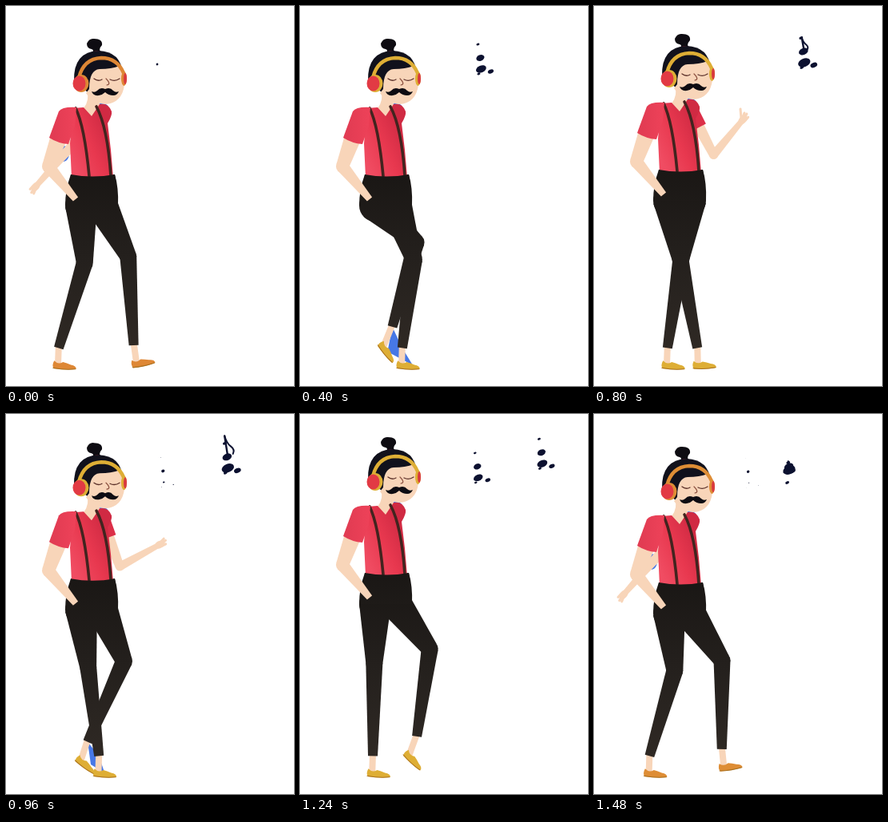
Animation, 360 px wide and 476 px high, one loop 1520 ms. Source, as an HTML page with a canvas:

```html
<!DOCTYPE html>
<html lang="en">
<head>
<meta charset="utf-8">
<title>Walking to music</title>
<style>
html, body { margin: 0; height: 100%; overflow: hidden; background: #fff; }
canvas { display: block; width: 360px; height: 476px; }
</style>
</head>
<body>
<canvas id="stage"></canvas>
<script>
const LOOP = 1520, STEP = 40, STANCE = 850;
const SKIN = '#f8d5b9', INK = '#0e0c12', NAVY = '#0c1130', BLUE = '#4778e6';
const canvas = document.getElementById('stage');
const dpr = window.devicePixelRatio || 1;
canvas.width = 360 * dpr;
canvas.height = 476 * dpr;
const ctx = canvas.getContext('2d');

// Key poses: time, then values
const bob = [[0, 0], [400, 0], [600, -12.5], [800, -6], [1080, -4], [1240, -12], [1480, 0]];
const reach = [[0, 39, 224], [400, 127, 238], [600, 203, 158], [800, 184, 145],
  [1080, 193, 178], [1240, 112, 236], [1480, 39, 224]];

const clamp = (v, lo = 0, hi = 1) => Math.min(hi, Math.max(lo, v));
const smooth = u => u * u * (3 - 2 * u);

function pose(keys, t) {
  const i = keys.findLastIndex(k => k[0] <= t), a = keys[i], b = keys[i + 1] || a;
  const u = smooth(clamp((t - a[0]) / (b[0] - a[0] || 1)));
  return a.slice(1).map((v, n) => v + (b[n + 1] - v) * u);
}

// Middle joint of a two-bone limb; side tells which way it folds
function bend(x0, y0, x1, y1, upper, lower, side) {
  const dx = x1 - x0, dy = y1 - y0, d = Math.hypot(dx, dy);
  const along = d < upper + lower
    ? (upper * upper - lower * lower + d * d) / (2 * d)
    : d * upper / (upper + lower);
  const out = side * Math.sqrt(Math.max(0, upper * upper - along * along)) * (d < upper + lower);
  return [x0 + (dx * along - dy * out) / d, y0 + (dy * along + dx * out) / d];
}

// One stride: the foot slides back on the ground, then swings forward
function stride(p, shift) {
  const u = clamp((p - STANCE) / (LOOP - STANCE));
  const x = shift + (p < STANCE ? 171 - 0.09 * p : 94.5 + 76.5 * smooth(u));
  const lift = 17 * Math.pow(Math.sin(Math.PI * u), 0.6);
  const deg = p < STANCE
    ? 3 - 15 * clamp(1 - p / 120)
    : 3 + 55 * Math.sin(Math.PI * Math.min(1, u * 1.25)) - 15 * u ** 4;
  const y = 450 - (lift || 0) + Math.min(0, deg) / 3;
  return { x, y, deg, ankleX: x - 8 + 0.28 * deg, ankleY: y - 21 - 0.2 * Math.max(0, deg) };
}

function fill(d, color) {
  ctx.fillStyle = color;
  ctx.fill(new Path2D(d));
}

function line(d, color, width) {
  ctx.strokeStyle = color;
  ctx.lineWidth = width;
  ctx.stroke(new Path2D(d));
}

function oval(x, y, rx, ry, color, turn = 0) {
  ctx.fillStyle = color;
  ctx.beginPath();
  ctx.ellipse(x, y, Math.max(0, rx), Math.max(0, ry), turn, 0, 7);
  ctx.fill();
}

function blend(x0, y0, x1, y1, ...colors) {
  const g = ctx.createLinearGradient(x0, y0, x1, y1);
  colors.forEach((c, i) => g.addColorStop(i / (colors.length - 1), c));
  return g;
}

const cloth = blend(0, 200, 0, 430, '#191614', '#24201d', '#2f2924');
const shirt = blend(80, 190, 134, 165, '#f04c62', '#e8384f', '#d02a43');

// Tapered limb through [x, y, radius] joints; the end is cut square
function limb(joints, color) {
  for (let i = 0; i < joints.length - 1; i++) {
    const [x, y, r] = joints[i], [x2, y2, r2] = joints[i + 1];
    const len = Math.hypot(x2 - x, y2 - y) || 1;
    const nx = (y - y2) / len, ny = (x2 - x) / len;
    fill(`M${x + nx * r} ${y + ny * r}L${x2 + nx * r2} ${y2 + ny * r2}` +
      `L${x2 - nx * r2} ${y2 - ny * r2}L${x - nx * r} ${y - ny * r}Z`, color);
    oval(x, y, r, r, color);
  }
}

function drawLeg(foot, hipX, hipY, gold) {
  const { x, y, deg, ankleX, ankleY } = foot, a = deg * Math.PI / 180;
  const [kneeX, kneeY] = bend(hipX, hipY, ankleX, ankleY, 72, 112, -0.9);
  line(`M${ankleX} ${ankleY - 3}L${x - 8 * Math.cos(a)} ${y - 8 * Math.sin(a)}`, SKIN, 8);
  ctx.save();
  ctx.translate(x, y);
  ctx.rotate(a);
  fill('M-13 -5Q-8 0 -2 -4Q3 -3 8 -1Q15 0 15 4Q8 6 -13 5Q-16 1 -13 -5Z', gold);
  line('M-14 4Q0 6 14 4', '#a8701f', 1);
  ctx.restore();
  limb([[hipX, hipY, 20], [kneeX, kneeY, 10.5], [ankleX, ankleY, 6]], cloth);
}

function drawFarArm(t, dy) {
  const x = 119, y = 134 + dy, [hx, hy] = pose(reach, t);
  const [ex, ey] = bend(x, y, hx, hy, 66, 54, 1);
  oval(119, 125 + dy, 8, 3, BLUE);
  if (Math.abs(hx - x) > 77) oval(72, 185 + dy * 0.4, 7, 10, BLUE);
  limb([[x, y, 8], [ex, ey, 5.5], [hx, hy, 3.5]], SKIN);
  ctx.save();
  ctx.translate(hx, hy);
  ctx.rotate(Math.atan2(hy - ey, hx - ex));
  oval(3, 0, 7, 4.5, SKIN);
  line('M5 -2L11 -4M6 0L12 -1M5 3L10 3', SKIN, 3);
  ctx.restore();
  if (t >= 720 && t < 920) line(`M${hx} ${hy - 5}L${hx - 1} ${hy - 16}`, SKIN, 3);
  const k = 27 / Math.hypot(ex - x, ey - y);
  limb([[x, y, 10], [x + (ex - x) * k, y + (ey - y) * k, 9.5]], '#dc2f48');
}

function drawBody() {
  fill('M81 211Q108 216 136 211Q141 228 140 250L74 250Q74 230 81 211Z', cloth);
  fill('M101 104Q105 118 97 128L107 139L118 124Q115 121 116 114Z', SKIN);
  fill('M84 128L97 127L107 138L117 123Q128 121 132 132Q133 137 127 147L131 180L134 215' +
    'L82 215L80 172Z', shirt);
  line('M87 128Q98 150 104 213M113 126Q127 152 131 213', '#42241f', 3.6);
  limb([[66, 165, 10.5], [53, 201, 8], [87, 242, 4]], SKIN);
  fill('M88 127Q70 126 66 132L54 165Q65 172 78 173L86 150Z',
    blend(60, 150, 88, 150, '#e23c53', '#ee4259'));
  fill('M81 211Q108 216 136 211L138 222L80 222Z', cloth);
}

function drawHead(gold) {
  fill('M101 47Q104 40 110 41Q121 41 120 49Q117 52 117 55Q119 59 122 61L107 61' +
    'Q111 55 107 54Q101 53 101 47Z', INK);
  oval(114, 58, 5, 1.8, '#b3283a');
  fill('M85 94Q84 57 116 56Q143 57 146 84L142 96L102 108Z', '#11111c');
  fill('M104 104Q104 80 117 79Q132 79 142 75Q149 86 148 99Q145 121 125 123' +
    'Q108 122 100 109Z', SKIN);
  line('M91 90Q97 66 119 65Q139 65 147 84', gold, 4.5);
  oval(147.5, 91, 3.5, 9, gold);
  oval(149, 91, 2, 7, '#d93a3f');
  oval(94, 97, 9.5, 11, gold);
  oval(91.5, 97, 8, 9.5, '#e23a44');
  line('M110 91Q115 95 120 92M130 92Q136 95 142 91', '#5b3029', 1.3);
  line('M125 91Q132 98 126 99', '#8c5140', 1.2);
  fill('M124 104Q118 101 114 106Q111 109 107 107Q109 113 116 112Q121 111 124 108' +
    'Q128 112 134 112Q139 112 141 107Q137 109 134 106Q130 101 124 104Z', INK);
}

// A note drifts up to the right; its drops gather, form a stem and scatter again
function drawNote(age, lit) {
  const x = 189 + 0.091 * age, y = 73 - 0.02 * age + 5 * clamp(1 - Math.abs(age - 600) / 150);
  const size = clamp(age / 480), spread = clamp(Math.abs(age - 600) / 200, 0.3);
  const fade = 1 - clamp((age - 1220) / 120);
  const drop = (dx, dy, r) =>
    oval(x + dx, y + dy, r * size * fade, r * 0.65 * size * fade, lit ? '#2c57b8' : NAVY, -0.4);
  drop(1 * spread, 14 * spread, 8);
  drop(-3 * spread, -17 * spread, 2.5);
  drop(13 * spread, 17 * spread, 4.5);
  drop(-2, 20, 2.5);
  oval(x, y, 1.4 + 4.6 * size * fade, 1.4 + 2.8 * size * fade, NAVY, -0.4);
  if (age < 560 || age > 1180) return;
  const h = (age - 480) * 0.055;
  line(`M${x + 1} ${y}L${x - h * 0.12} ${y - h}`, NAVY, 2.4);
  if (h > 12) line(`M${x - h * 0.12} ${y - h}q${h * 0.1} ${h * 0.35} ${h * 0.3} ${h * 0.5}` +
    `t${h * 0.1} ${h * 0.35}`, NAVY, 2);
}

function draw(t) {
  const [dy] = pose(bob, t);
  const near = stride(t, 0), far = stride((t + 800) % LOOP, -26);
  const gold = `hsl(${43 - 14 * clamp(1 - Math.min(t, LOOP - t) / 250)} 72% 54%)`;
  ctx.setTransform(dpr, 0, 0, dpr, 0, 0);
  ctx.fillStyle = '#fff';
  ctx.fillRect(0, 0, 360, 476);
  ctx.lineCap = ctx.lineJoin = 'round';
  if (Math.abs(near.x - far.x) < 30) {
    fill(`M${near.ankleX} ${near.ankleY}L${far.ankleX} ${far.ankleY}` +
      `L${far.x} ${far.y}L${near.x + 6} ${near.y}Z`, BLUE);
  }
  drawFarArm(t, dy);
  drawLeg(far, 94, 250 + dy, gold);
  drawLeg(near, 120, 250 + dy, gold);
  ctx.translate(0, dy);
  drawBody();
  drawHead(gold);
  ctx.translate(0, -dy);
  for (const begin of [0, 880, 1440]) {
    const age = t - begin;
    if (age >= 0 && age < 1340) drawNote(age, t >= 1000 && t < 1160);
  }
}

const start = performance.now();
function tick() {
  const t = (performance.now() - start) % LOOP;
  draw(Math.floor(t / STEP) * STEP);
  requestAnimationFrame(tick);
}
tick();
</script>
</body>
</html>
```
